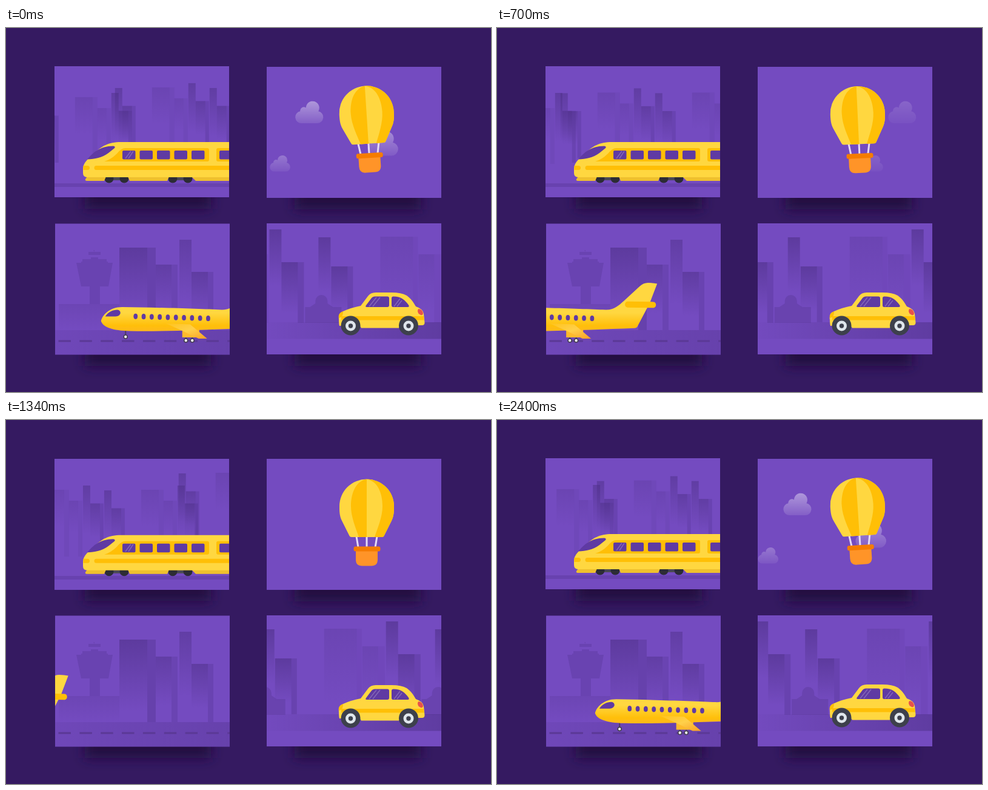
Write an HTML page that moves like this. It is 800 by 600 pixels and loops after 2.42 s.

```html
<!DOCTYPE html>
<html lang="en">
<head>
<meta charset="utf-8">
<title>Travel cards</title>
<style>
  html, body { margin: 0; width: 100%; height: 100%; overflow: hidden; background: #351a61; }
  body > svg { display: block; width: 800px; height: 600px; }
  .panel { fill: #744bc0; }
  .dark { fill: #4a2d82; }
  .light { fill: #ffd740; }
  .amber { fill: #ffbf06; }
  .glass { fill: #5f3aa3; }
  .tyre { fill: #3d404c; }
  .streak { stroke: #fff; stroke-width: 1.6; opacity: .22; }
</style>
</head>
<body>
<svg viewBox="0 0 800 600">
  <defs>
    <filter id="blur" x="-30%" y="-100%" width="160%" height="300%"><feGaussianBlur stdDeviation="10"/></filter>
    <linearGradient id="fade" x2="0" y2="1">
      <stop stop-color="#4a2d82" stop-opacity=".55"/><stop offset="1" stop-color="#4a2d82" stop-opacity="0"/>
    </linearGradient>
    <linearGradient id="road">
      <stop stop-color="#4a2d82" stop-opacity=".03"/><stop offset="1" stop-color="#4a2d82" stop-opacity=".5"/>
    </linearGradient>
    <linearGradient id="runway">
      <stop stop-color="#4a2d82" stop-opacity=".12"/><stop offset="1" stop-color="#4a2d82" stop-opacity=".32"/>
    </linearGradient>
    <linearGradient id="mist" x2="0" y2="1">
      <stop stop-color="#fff" stop-opacity=".65"/><stop offset="1" stop-color="#fff" stop-opacity=".17"/>
    </linearGradient>
    <linearGradient id="hull" gradientUnits="userSpaceOnUse" x1="0" y1="462" x2="0" y2="500">
      <stop offset=".2" stop-color="#ffd740"/><stop offset=".75" stop-color="#ffbf0a"/><stop offset="1" stop-color="#ffb81c"/>
    </linearGradient>
    <linearGradient id="wing" x2="1" y2="1">
      <stop stop-color="#ffc31c"/><stop offset=".5" stop-color="#ffd04a"/><stop offset="1" stop-color="#f99f25"/>
    </linearGradient>
    <path id="cloud" fill="url(#mist)" d="M10 35A10 10 0 0 1 8 15.2A6 6 0 0 1 17.5 9.5A11 11 0 1 1 38 15.2A10 10 0 0 1 36 35Z"/>
  </defs>

  <g id="shadows" fill="#200d40" filter="url(#blur)"></g>

  <svg id="trainCard" x="80" y="63" width="288" height="216" viewBox="80 63 288 216">
    <rect class="panel" x="80" y="63" width="288" height="216"/>
    <g id="cityNear"></g>
    <g id="cityFar"></g>
    <rect class="dark" x="80" y="256" width="288" height="6" opacity=".28"/>
    <g id="train">
      <path fill="#4a4955" d="M172 245h20v6h-20zM277 245h20v6h-20z"/>
      <g id="bogies" fill="#2c2c35"></g>
      <path fill="#efc02e" d="M134 245h31l-3 7h-29q-3 0-2-3zM201 245h68l-3 7h-62zM306 245h62v7h-55z"/>
      <path class="light" d="M368 188H190C168 188 158 195 146 206C136 215 127 222 127 232V239Q127 246 134 246H368z"/>
      <path class="amber" d="M162 220Q173 217 183 207Q190 198 197 198H332Q335 198 335 201V217Q335 220 332 220zM368 198h-18q-3 0-3 3v16q0 3 3 3h18zM368 227H149a3.5 3.5 0 0 0 0 7H368zM127.500 227h7a3.500 3.500 0 0 1 0 7h-7z"/>
      <path class="glass" d="M134 216.500C144 205 154 195 177 194.500Q181 195 179 198L169 206C158 214 147 216 134 216.500z"/>
      <g id="trainWindows" class="glass"></g>
      <path class="streak" d="M197 215l9-12M202 215l8-12"/>
    </g>
  </svg>

  <svg x="430" y="64" width="288" height="216" viewBox="430 64 288 216">
    <rect class="panel" x="430" y="64" width="288" height="216"/>
    <g id="clouds"></g>
    <g id="balloon">
      <path fill="none" stroke="#e5daf5" stroke-width="3" d="M578 192l3 18M595 192v18M612 192l-3 18"/>
      <path class="light" d="M570 193Q567 193 566 190L554 166C550 158 550 150 550 142A45 44.500 0 0 1 640 142C640 150 640 158 636 166L624 190Q623 193 620 193z"/>
      <path class="amber" d="M595 97.500C576 101 569 122 569 142C569 160 577 178 582 193H595z"/>
      <path class="amber" d="M595 97.500C614 101 621 122 621 142C621 160 613 178 608 193H620Q623 193 624 190L636 166C640 158 640 150 640 142A45 44.500 0 0 0 595 97.500z"/>
      <path fill="#ff9428" d="M577 215h36v15q0 10.500-10.500 10.500h-15q-10.500 0-10.500-10.500z"/>
      <rect x="573.500" y="208.500" width="44" height="8" rx="3" fill="#f57c00"/>
    </g>
  </svg>

  <svg x="81" y="322.500" width="288" height="216" viewBox="81 322.500 288 216">
    <rect class="panel" x="81" y="322" width="288" height="217"/>
    <path class="dark" opacity=".26" d="M144 366h2v3h10v5h-10v4h6v3h14v4h2v2h8l-7 39h-14v29h-17v-29h-14l-8-39h8v-2h2v-4h14v-3h6v-4h-10v-5h10z"/>
    <rect x="87" y="455" width="100" height="43" fill="url(#fade)" opacity=".35"/>
    <g id="airport"></g>
    <rect x="81" y="498" width="288" height="41" fill="url(#runway)"/>
    <path stroke="#5b3996" stroke-width="3" stroke-dasharray="20.500 14.350" d="M86.500 516H369"/>
    <g id="plane">
      <path stroke="#4b3a63" stroke-width="2" d="M197.500 498v8M297 508v5M307.500 508v5"/>
      <path fill="#ffba2c" d="M291 497h28v13h-28z"/>
      <path fill="url(#hull)" d="M157 483C159 474 170 460 192 460C250 460.500 320 463 356 464.500C370 465 378 457 386 450L412 426Q418 420 426 420Q434 420 441 421.500L429 453L409 491Q408 494.500 403 494.800C340 497 270 500.500 205 499.500C176 499 160 493 157 483z"/>
      <rect class="amber" x="388" y="451" width="51" height="10" rx="4.500" transform="rotate(1 413 456)"/>
      <path fill="url(#wing)" d="M264 487L304 488.500L332 512H318L291 499z"/>
      <path class="glass" d="M164 475.500C169 468 176 464.500 184 464.500Q189 465 189 470Q188 475 181 475.500z"/>
      <g id="portholes" class="glass"></g>
      <g id="gear" fill="#f4f0fa" stroke="#45404f" stroke-width="1.600"></g>
    </g>
  </svg>

  <svg x="430" y="322" width="288" height="216" viewBox="430 322 288 216">
    <rect class="panel" x="430" y="322" width="288" height="216"/>
    <g id="street"></g>
    <rect x="430" y="485" width="288" height="27.500" fill="url(#road)"/>
    <g id="car">
      <path class="light" d="M550 491Q549 488 549 481Q547 471 556 467Q569 461 585 458L597 442Q601 436 610 436H636Q652 436 661 441C668 446 672 452 676 459Q688 463 689 471L690.500 485Q691 490 686 490H651L648 494.500H586L583 490z"/>
      <path class="amber" d="M553 475H689l.7 6.500H553zM556 467q0 8-4 10l-3 1q-2-8 7-11z"/>
      <path class="glass" d="M595 460q-3 0-1-3l9-12q2-2.500 5-2.500h21q3 0 3 3v11.500q0 3-3 3zM638.500 460q-2.500 0-2.500-3v-11.500q0-3 3-3c13 0 19 6 25 14q2 3.500-1.500 3.500z"/>
      <path class="streak" d="M599 459l12-15M605 459l12-15M640 459l10-13M645 459l8-10"/>
      <path fill="#e8514b" d="M680 463q7 0 8 8q-1 3-4 2q-5-2-5-7z"/>
      <g id="wheels"></g>
    </g>
  </svg>
</svg>

<script>
const $ = id => document.getElementById(id);
const rect = (x, y, w, h, attrs = '') => `<rect x="${x}" y="${y}" width="${w}" height="${h}" ${attrs}/>`;
const circle = (x, y, r, attrs = '') => `<circle cx="${x}" cy="${y}" r="${r}" ${attrs}/>`;
const range = (n, draw) => Array.from({ length: n }, (_, i) => draw(i)).join('');

// A block whose front fades downwards, with an optional flat side wall.
const tower = (x, y, front, side, fadeTo, bottom, strength = 1) =>
  rect(x, y, front, fadeTo - y, `fill="url(#fade)" opacity="${strength}"`) +
  (side ? rect(x + front, y, side, bottom - y, `class="dark" opacity="${.28 * strength}"`) : '');

const suburb = x => tower(x, 114, 29, 8, 175, 224, .4) + tower(x + 37, 132, 15, 7, 185, 224, .4);
const pair = (x, y) => tower(x, y, 12, 0, y + 80, 0, .85) + tower(x + 12, y + 29.5, 16, 6, y + 85, 222, .85);
const firstPair = x => pair(x + 60, 107);
const lastPair = x => pair(x + 95, 115);
const block = x => suburb(x) + firstPair(x) + lastPair(x);

const street = x =>
  tower(x, 332, 20, 0, 425, 0) + tower(x + 20, 386, 27, 10, 470, 486) +
  tower(x + 81, 345, 20, 0, 435, 0) + tower(x + 102, 393, 27, 9, 465, 485) +
  tower(x + 183, 344, 54, 8, 465, 486, .38) + tower(x + 246, 373, 26, 11, 465, 486, .38) +
  `<path class="dark" opacity=".27" transform="translate(${x + 59} 440)"
    d="M0 46V20H8L17 14V10A10 10 0 0 1 37 10V14L46 20H60V46z"/>`;

$('shadows').innerHTML = [[130, 262], [476, 263], [130, 521], [476, 521]]
  .map(([x, y]) => rect(x, y, 208, 36)).join('');
$('cityNear').innerHTML = block(-312) + block(-156) + suburb(0) + firstPair(0);
$('cityFar').innerHTML = lastPair(-156) + block(0) + block(156);
$('bogies').innerHTML = [170, 195, 275, 300].map(x => circle(x, 248, 7.5)).join('');
$('trainWindows').innerHTML = range(5, i => rect(192 + 28.5 * i, 202, 21.5, 14.5, 'rx="2"')) +
  rect(352, 202, 24, 14.5, 'rx="2"');
$('airport').innerHTML =
  tower(187, 362, 46, 14, 480, 498, 1.2) + tower(247, 390, 26, 10, 470, 498, .8) +
  tower(286, 349, 20, 0, 455, 0, .8) + tower(306, 402, 27, 9, 475, 498, .9);
$('portholes').innerHTML = range(10, i =>
  `<ellipse cx="${214 + 13.3 * i}" cy="${475.3 + .37 * i}" rx="3.400" ry="4.600"/>`);
$('gear').innerHTML = circle(197.5, 509, 3) + circle(297, 515, 3) + circle(307.5, 515, 3);
$('street').innerHTML = range(4, i => street(285 * (i - 1)));
$('wheels').innerHTML = [568.5, 664].map(x =>
  circle(x, 490.5, 16, 'class="tyre"') + circle(x, 491, 8.5, 'fill="#dfe6ec"') +
  circle(x, 491, 3.7, 'class="tyre"')).join('');

const clouds = [[477, 122, 1, .65], [596, 172, 1.1, 1], [435, 211, .73, .38]];
$('clouds').innerHTML = clouds.map(() => '<use href="#cloud"/>').join('');

const mod = (a, n) => (a % n + n) % n;
const clamp = (v, lo = 0, hi = 1) => Math.min(hi, Math.max(lo, v));

// Linear interpolation through rows of [time, ...values].
function track(rows, t) {
  const i = clamp(rows.findIndex(row => row[0] > t), 1, rows.length - 1);
  const [a, b] = t >= rows.at(-1)[0] ? rows.slice(-2) : [rows[i - 1], rows[i]];
  const k = (t - a[0]) / (b[0] - a[0]);
  return a.slice(1).map((v, j) => v + (b[j + 1] - v) * k);
}

const bounce = [[0, 0], [900, 0], [1340, 1.7], [1740, 1.7], [2000, 1], [2300, 0], [2400, 0]];
const swing = [[0, 1], [500, .93], [900, .5], [1340, 0], [1740, .75], [2000, 1], [2400, 1]];
const landing = [[1430, 380, 402, 7], [1740, 310, 434, 6.2], [2000, 253, 461.5, 5], [2200, 205, 476, 2.3], [2380, 162, 483.3, .1], [2400, 157, 483, 0]];
const move = (id, transform) => $(id).setAttribute('transform', transform);

function draw(now) {
  const loop = now % 2420;
  const t = loop - 20 * clamp((loop - 1340) / 420);

  const [bob] = track(bounce, t);
  const step = bob > .4 ? 1 : 0;
  const u = mod(t + 200, 400) - 200;
  $('trainCard').setAttribute('y', 63 + step);
  move('train', `translate(0 ${bob - step})`);
  move('cityNear', `translate(${113 + .78 * u} 0)`);
  move('cityFar', `translate(${240 + .75 * u} ${-16 - .085 * u})`);

  const [tilt] = track(swing, t);
  move('balloon', `translate(0 ${-2.2 * tilt}) rotate(${-3.7 * tilt} 595 147)`);
  clouds.forEach(([x0, y, size, strength], i) => {
    const x = 380 + mod(x0 + .24 * t - 380, 576);
    const cloud = $('clouds').children[i];
    cloud.setAttribute('transform', `translate(${x} ${y}) scale(${size})`);
    cloud.setAttribute('opacity', strength * clamp(1 - (x - 480) / 250, .2));
  });

  const [x, y, angle] = t < 1430 ? [157 - .2523 * t, 483, 0] : track(landing, t);
  move('plane', `translate(${x} ${y}) rotate(${angle}) translate(-157 -483)`);

  move('street', `translate(${434 + mod(.35625 * t, 285)} 0)`);
  move('car', `translate(0 ${.6 * bob})`);
  requestAnimationFrame(() => draw(performance.now()));
}
draw(performance.now());
</script>
</body>
</html>
```
